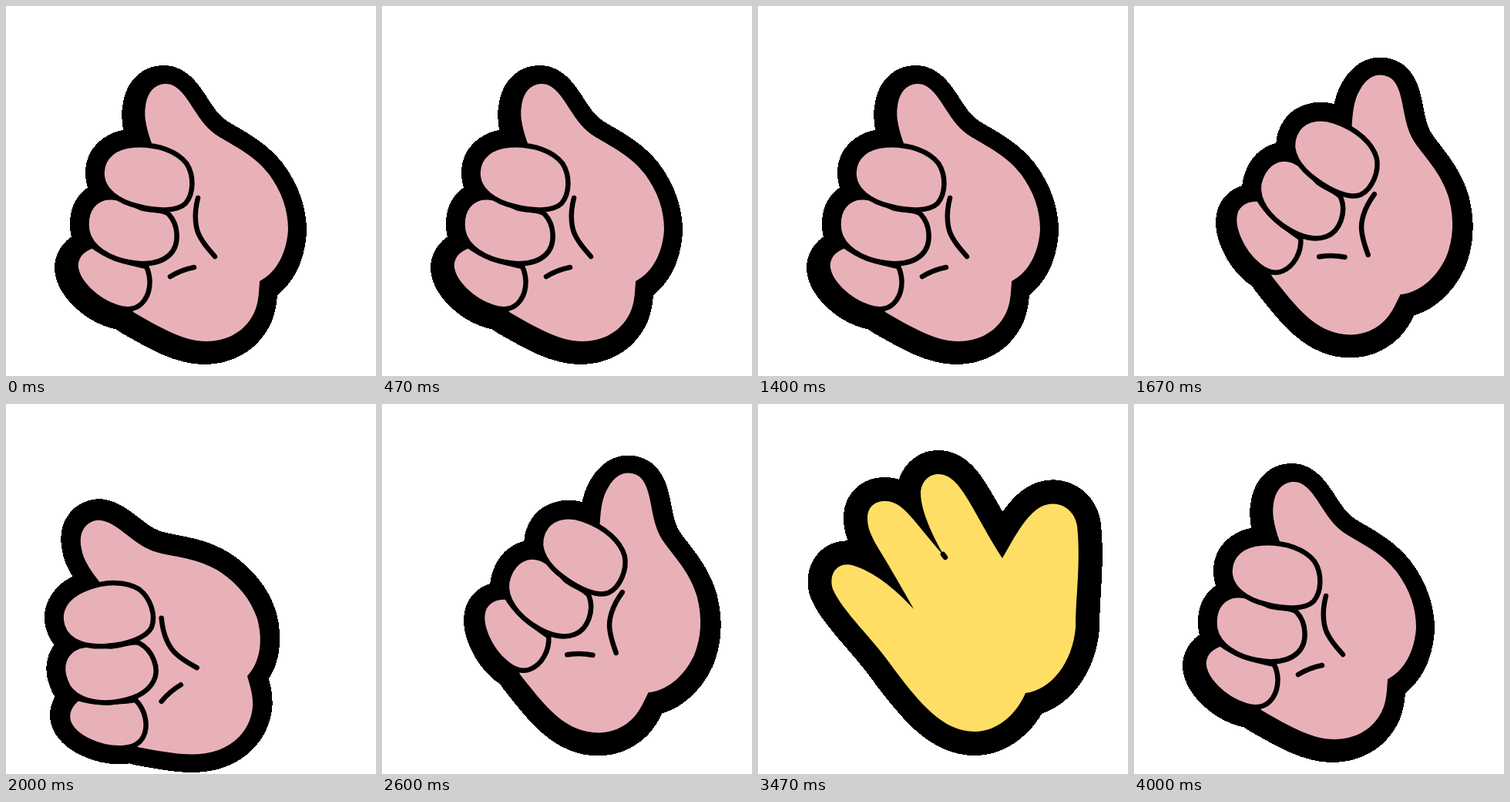
Animation, 480 px wide and 480 px high, one loop 4.07 s. Source, as an HTML page:

```html
<!DOCTYPE html>
<html lang="en">
<head>
<meta charset="utf-8">
<title>Rock, scissors, paper</title>
<style>
  html, body { margin: 0; width: 100%; height: 100%; overflow: hidden; background: #fff; }
  svg { display: block; width: 100vw; height: 100vh; }
  svg > g { visibility: hidden; }
  .back { fill: #000; stroke: #000; stroke-linejoin: round; shape-rendering: crispEdges; }
  .line { stroke: #000; stroke-width: 6.5; stroke-linecap: round; stroke-linejoin: round; }
  .open { fill: none; }
</style>
</head>
<body>
<svg id="stage" viewBox="0 0 480 480"></svg>
<script>
const PINK = '#e8b1b8', YELLOW = '#ffde66';

// Fist, drawn in its middle tilt
const PALM = 'M191 184C184 165 178 145 181 130C184 108 196 101 208 101C222 101 233 117 243 133' +
  'C254 150 262 161 277 170C300 184 322 194 341 218C358 241 366 265 366 290C364 322 350 346 329 357' +
  'C328 372 328 390 318 405C306 424 285 435 260 435C230 435 200 417 165 397L150 370V290L160 220Z';
const FINGERS = [
  'M112 311C130 325 150 331 182 338C190 355 187 375 176 386C168 394 158 395 145 391C118 383 90 357 90.5 335C92 322 100 316 112 311Z',
  'M135 248C155 249 165 258 175 262C190 266 205 264 211 270C224 284 226 310 212 323C198 336 175 336 153 331C125 324 104 307 104.5 284C104 264 115 249 135 248Z',
  'M166 180.5C198 179 222 189 234 204C244 219 244 243 233 256C222 267 195 266 172 260C147 254 124 240 124.5 216C125 195 142 182 166 180.5Z'
];
const CREASES = 'M249 249C243 272 246 290 252 300C258 311 265 318 271 325M213 351Q228 342 244 339';

// Open hands share the heel, the two long fingers and the folded thumb
const HEEL = 'C408 336 380 371 347 375C335 403 310 425 281 425C240 425 210 388 178 346';
const LOBE = 'C327 200 336 200 345 201C390 208 412 250 412 290' + HEEL;
const LONG = 'C187 239 172 213 156 187C146 170 142 160 142 148C142 134 151 126 165 126' +
  'C189 126 201 152 243 199C231 180 211 141 211 115C212 100 222 91 234 91C263 91 277 138 317 200';
const CURLED = 'M205 270C220 290 222 320 207 336C198 344 190 347 178 347C150 335 129 305 129.5 284C130 262 144 248 163 248C182 248 195 256 205 270Z';
const THUMB = 'M320 201C290 207 260 238 260 262C261 282 276 291 297 291C322 291 342 272 352 253';
const GAP = 'M240 195L243 199';
const VICTORY = 'M205 270' + LONG + LOBE + 'Z';
const ROCK = 'M317 201' + LOBE + 'L190 300L230 200Z';
const PAPER = 'M178 346C150 305 110 270 97 240C91 219 104 205 122 209C150 217 178 240 202 266' +
  LONG + 'C329 180 342 153 360 138C382 120 410 132 414 158C419 205 412 250 412 290' + HEEL + 'Z';

const path = (d, cls, attrs = '') => `<path d="${d}" class="${cls}" ${attrs}/>`;
const back = (d, reach) => path(d, 'back', `stroke-width="${reach * 2}"`);
const flat = (d, color) => path(d, '', `fill="${color}"`);
const lined = (d, color) => path(d, 'line', `fill="${color}"`);
const stroke = d => path(d, 'line open');
const group = (transform, body) => `<g transform="${transform}">${body}</g>`;
const tilt = (x, y, angle) => `translate(${x} ${y}) rotate(${angle}) translate(-329 -357)`;
const RIGHT = tilt(345.5, 374.3, 22);

function fist(turn, reach, dx, dy) {
  const [low, mid, top] = FINGERS;
  return group(`translate(${dx} ${dy})`, group(turn, back(PALM, reach) + back(low, reach - 2.5))) +
    group(turn, back(mid, 21.5) + back(top, 21.5) + flat(PALM, PINK) +
      FINGERS.map(d => lined(d, PINK)).join('') + stroke(CREASES));
}

function scissors() {
  return group('translate(0 -1)', back(VICTORY, 28)) + back(CURLED, 20.5) +
    flat(VICTORY, YELLOW) + lined(CURLED, YELLOW) + stroke(THUMB) + stroke(GAP);
}

function rock() {
  return back(ROCK, 29) + group(RIGHT, FINGERS.map(d => back(d, 23)).join('')) +
    flat(ROCK, YELLOW) + group(RIGHT, FINGERS.map(d => lined(d, YELLOW)).join('')) +
    flat(THUMB, YELLOW) + stroke(THUMB);
}

function paper() {
  return back(PAPER, 31) + flat(PAPER, YELLOW) + stroke(GAP);
}

const poses = {
  mid: fist(tilt(329, 357, 0), 27, -3, 3),
  left: fist(tilt(313, 353, -19.4), 25.5, 0, -2),
  right: fist(RIGHT, 26.5, 0, 3.5),
  scissors: scissors(),
  rock: rock(),
  paper: paper()
};

const LOOP = 4070;
const steps = [
  [0, 'mid'], [200, 'left'], [330, 'right'], [470, 'mid'], [600, 'left'], [800, 'scissors'],
  [1200, 'right'], [1400, 'mid'], [1530, 'left'], [1670, 'right'], [1800, 'mid'], [2000, 'left'], [2130, 'rock'],
  [2600, 'right'], [2730, 'mid'], [2870, 'left'], [3070, 'right'], [3200, 'mid'], [3330, 'left'], [3470, 'paper'],
  [3930, 'right'], [4000, 'mid']
];

const stage = document.getElementById('stage');
stage.innerHTML = Object.entries(poses).map(([name, body]) => `<g id="${name}">${body}</g>`).join('');

const start = performance.now();
let shown = null;
function draw() {
  const t = (performance.now() - start) % LOOP;
  const name = steps.findLast(([at]) => at <= t)[1];
  if (name !== shown) {
    for (const g of stage.children) g.style.visibility = g.id === name ? 'visible' : 'hidden';
    shown = name;
  }
  requestAnimationFrame(draw);
}
draw();
</script>
</body>
</html>
```
